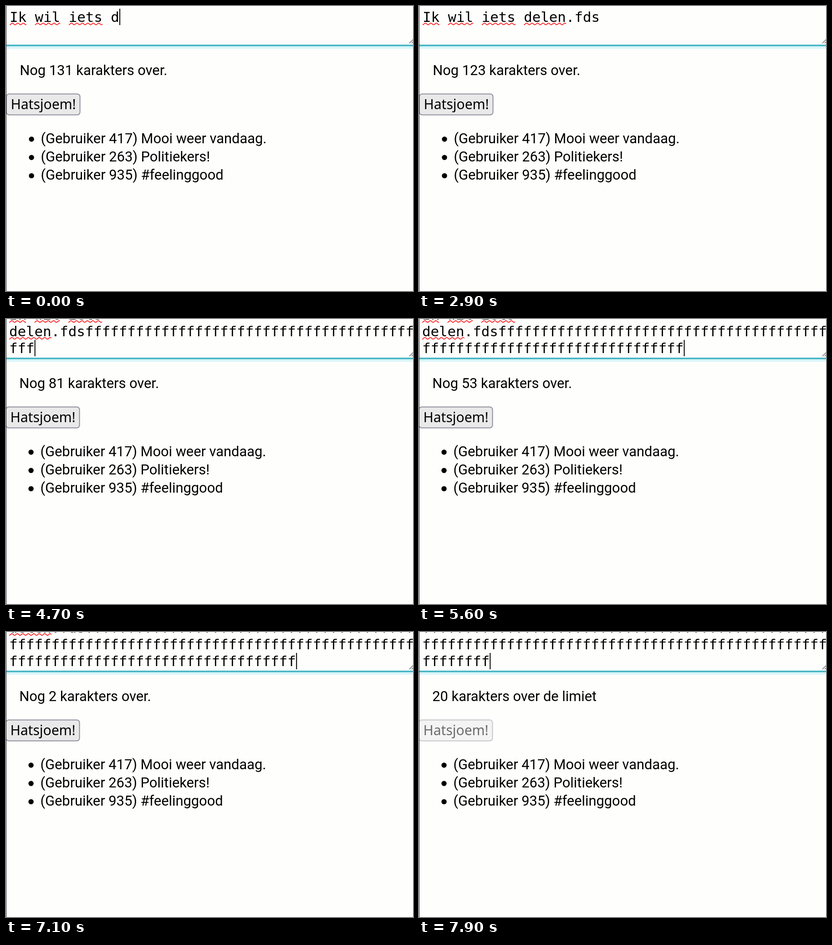
An HTML page with a canvas for the animation above (8 s loop, 894 by 627 pixels).

```html
<!DOCTYPE html>
<html lang="nl">
<head>
<meta charset="utf-8">
<title>Berichtveld met tekenteller</title>
<style>
html, body { margin: 0; width: 100%; height: 100%; overflow: hidden; background: #fefefd; }
canvas { display: block; width: 894px; height: 627px; }
</style>
</head>
<body>
<canvas id="stage" width="894" height="627"></canvas>
<script>
const ctx = document.getElementById("stage").getContext("2d");

const LOOP = 8000, STEP = 100;
const LIMIT = 144, COLUMNS = 48;
const ADVANCE = 18.535, ROW = 37;
const MONO = '30.787px "DejaVu Sans Mono", monospace';
const BODY = "30.8px Roboto, sans-serif";
const BUTTON = '30px "Noto Sans", sans-serif';
const FIRST_ROW = "Ik wil iets ";
const MESSAGE = FIRST_ROW + "delen.fds";
const POSTS = [
  "(Gebruiker 417) Mooi weer vandaag.",
  "(Gebruiker 263) Politiekers!",
  "(Gebruiker 935) #feelinggood"
];

// Single key presses: [time, length after the press]
const PRESSES = [
  [0, 13], [100, 14], [600, 15], [700, 16], [800, 17], [1400, 18],
  [1900, 19], [2100, 20], [2200, 21], [3000, 22], [3500, 23]
];
// Held key: length grows evenly between these points
const REPEAT = [
  [3600, 23], [3900, 34], [4700, 63], [5000, 73], [5100, 73], [6000, 105],
  [6300, 116], [6600, 127], [6700, 127], [7100, 142], [7500, 155],
  [7700, 163], [7800, 163], [7900, 164]
];
const CARET_OFF = [[500, 600], [1700, 1900], [2900, 3000]];

function lengthAt(t) {
  if (t < REPEAT[0][0]) return PRESSES.filter(p => p[0] <= t).pop()[1];
  const i = REPEAT.findIndex(p => p[0] >= t);
  const [t1, n1] = REPEAT[i];
  if (t1 === t) return n1;
  const [t0, n0] = REPEAT[i - 1];
  return Math.round(n0 + (n1 - n0) * (t - t0) / (t1 - t0));
}

function wrap(text) {
  if (text.length <= COLUMNS) return [text];
  const rows = [FIRST_ROW];
  for (let i = FIRST_ROW.length; i < text.length; i += COLUMNS) {
    rows.push(text.slice(i, i + COLUMNS));
  }
  return rows;
}

function label(text, x, y, font, color = "#000") {
  ctx.font = font;
  ctx.fillStyle = color;
  ctx.fillText(text, x, y);
}

function line(points, color, width) {
  ctx.beginPath();
  points.forEach(([x, y]) => ctx.lineTo(x, y));
  ctx.strokeStyle = color;
  ctx.lineWidth = width;
  ctx.stroke();
}

function squiggle(row, col, count, y) {
  const left = 8 + col * ADVANCE, right = left + count * ADVANCE;
  const points = [];
  let low = true;
  for (let x = left - 1; x < right + 6; x += 6, low = !low) {
    const py = y + row * ROW + (low ? 1.8 : -1.8);
    points.push([x, py], [x + 2, py]);
  }
  ctx.save();
  ctx.beginPath();
  ctx.rect(left, -200, right - left, 400);
  ctx.clip();
  line(points, "#f00", 1.6);
  ctx.restore();
}

function drawTextarea(t, n) {
  const rows = wrap(MESSAGE.padEnd(n, "f").slice(0, n));
  const last = rows.length - 1;
  const scroll = rows.length > 2 ? (rows.length - 2) * ROW - 3 : 0;

  ctx.fillStyle = "#d9f5f9";
  ctx.fillRect(1, 88, 893, 6);
  ctx.fillStyle = "#45b5c3";
  ctx.fillRect(1, 85, 894, 3.5);

  ctx.save();
  ctx.beginPath();
  ctx.rect(0, 0, 896, 85);
  ctx.clip();
  ctx.translate(0, -scroll);
  rows.forEach((text, i) => label(text, 8, 35 + i * ROW, MONO));
  [[0, 2], [3, 3], [7, 4]].forEach(([col, count]) => squiggle(0, col, count, 39.5));
  if (t >= 1500) {
    squiggle(last ? 1 : 0, last ? 0 : FIRST_ROW.length, 5, 39.5);
  }
  if (!CARET_OFF.some(([from, to]) => t >= from && t < to)) {
    ctx.fillStyle = "#000";
    ctx.fillRect(8 + rows[last].length * ADVANCE, 6 + last * ROW, 2, 36);
  }
  ctx.restore();
}

function drawButton(disabled) {
  ctx.beginPath();
  ctx.roundRect(1, 193.5, 161.5, 46, 6);
  ctx.fillStyle = disabled ? "#f3f4f3" : "#e9e9ea";
  ctx.fill();
  ctx.strokeStyle = disabled ? "#c6c6ca" : "#8f8f9b";
  ctx.lineWidth = 2;
  ctx.stroke();
  label("Hatsjoem!", 10.5, 227, BUTTON, disabled ? "#6c6c6c" : "#000");
}

function drawPosts() {
  POSTS.forEach((text, i) => {
    const y = 302 + i * 40.2;
    ctx.fillStyle = "#000";
    ctx.beginPath();
    ctx.arc(56, y - 9, 5.7, 0, 2 * Math.PI);
    ctx.fill();
    label(text, 76.5, Math.round(y), BODY);
  });
}

function draw(time) {
  const t = Math.floor(time % LOOP / STEP) * STEP;
  const n = lengthAt(t), left = LIMIT - n;

  ctx.fillStyle = "#fefefd";
  ctx.fillRect(0, 0, 894, 627);

  // The page scrolls sideways a little once the caret meets the right edge
  ctx.save();
  if (n >= COLUMNS) ctx.translate(-1, 0);
  drawTextarea(t, n);
  label(left >= 0 ? `Nog ${left} karakters over.` : `${-left} karakters over de limiet`,
    30.3, 152, BODY);
  drawButton(left < 0);
  drawPosts();
  ctx.restore();

  line([[886, 82], [895, 73]], "#666", 1.3);
  line([[891, 82], [895, 78]], "#666", 1.3);
  ctx.fillStyle = "#333";
  ctx.fillRect(0, 0, 1, 627);
}

let start;
function tick(now) {
  start ??= now;
  draw(now - start);
  requestAnimationFrame(tick);
}
draw(0);
requestAnimationFrame(tick);
</script>
</body>
</html>
```
